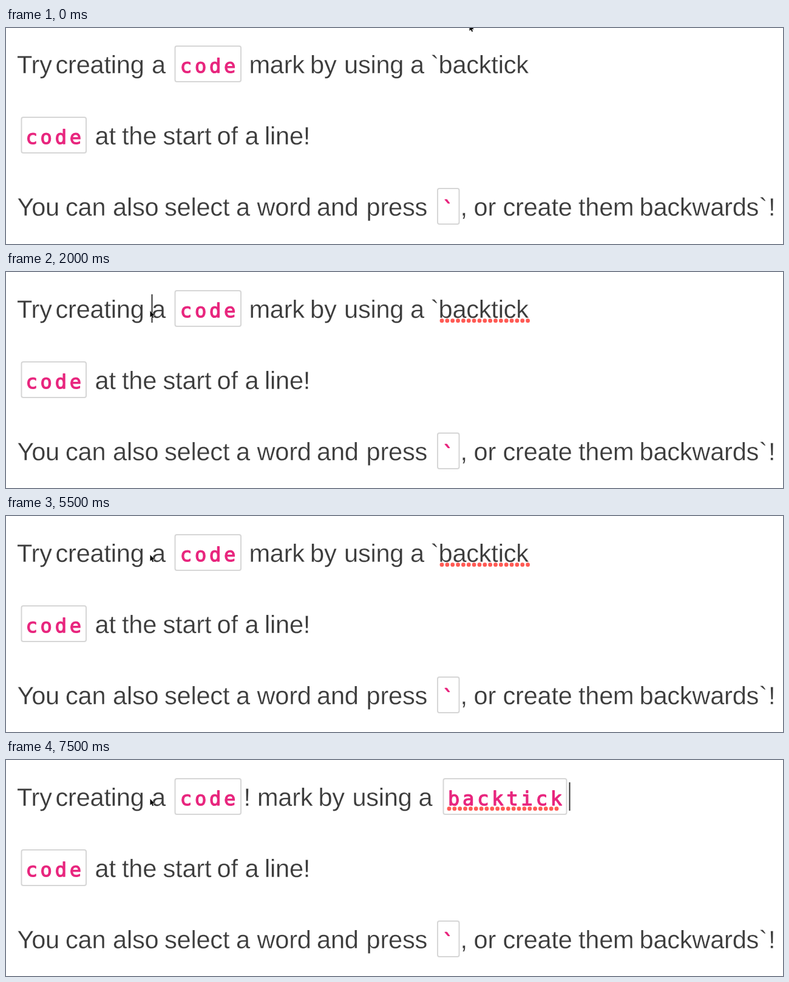
An HTML page that plays this animation: 1280 by 358 pixels, repeating every 8000 ms.

```html
<!DOCTYPE html>
<html lang="en">
<head>
<meta charset="utf-8">
<title>Code marks</title>
<style>
  html, body { margin: 0; width: 100%; height: 100%; overflow: hidden; background: #fff; }
  svg { display: block; width: 1280px; height: 358px; }
  text { white-space: pre; text-rendering: geometricPrecision; }
  /* the white stroke trims the glyphs to a lighter weight */
  .word { font: 41.5px "Liberation Sans", Arial, sans-serif; letter-spacing: -.2px;
          fill: #3c3c3c; stroke: #fff; stroke-width: .3px; }
  .code { font: 32px "DejaVu Sans Mono", monospace; letter-spacing: 4.84px;
          fill: #e8267e; stroke: #e8267e; stroke-width: 1.3px; stroke-linejoin: round; }
  .box { fill: #fff; stroke: #d6d6d6; stroke-width: 2px; }
  .dots { fill: #ff5a54; }
</style>
</head>
<body>
<svg viewBox="0 0 1280 358" xmlns="http://www.w3.org/2000/svg">
  <g id="page"></g>
  <rect id="caret" y="37" width="2" height="47" fill="#333"/>
  <path id="pointer" d="M.5 .5V10.8L2.8 8.7L4.4 12.3L6.1 11.5L4.5 8H7.8Z"
        fill="#000" stroke="#fff" stroke-width="1" stroke-linejoin="round" paint-order="stroke"/>
</svg>
<script>
const LOOP = 8000;
const NS = 'http://www.w3.org/2000/svg';
const byId = id => document.getElementById(id);
const page = byId('page'), caret = byId('caret'), pointer = byId('pointer');

function add(parent, tag, attrs = {}, content = '') {
  const el = document.createElementNS(NS, tag);
  for (const key in attrs) el.setAttribute(key, attrs[key]);
  el.textContent = content;
  parent.append(el);
  return el;
}

const group = parent => add(parent, 'g');

function words(parent, y, list) {
  for (const [x, content] of list) add(parent, 'text', { class: 'word', x, y }, content);
}

function mark(parent, x, width, y, textX, content) {
  add(parent, 'rect', { class: 'box', x, y: y - 44.5, width, height: 59, rx: 3 });
  add(parent, 'text', { class: 'code', x: textX, y: y - .2 }, content);
}

function dots(parent, x, y, count) {
  const g = add(parent, 'g', { class: 'dots' });
  for (let i = 0; i < count; i++) add(g, 'circle', { cx: x + i * 8.85, cy: y, r: 3.4 });
  return g;
}

// First line
words(page, 74.5, [[18, 'Try'], [81.5, 'creating'], [240, 'a']]);
mark(page, 278.5, 108.5, 74.5, 286.8, 'code');
const bang = group(page);
words(bang, 74.5, [[391.5, '!']]);
const tail = group(page);
words(tail, 74.5, [[400.5, 'mark'], [501, 'by'], [557, 'using'], [666, 'a']]);
const plain = group(tail);
words(plain, 74.5, [[699.5, '`'], [712.5, 'backtick']]);
const spelling = dots(plain, 718, 79.7, 17);
const marked = group(page);
mark(marked, 720.5, 203, 74.5, 728, 'backtick');
dots(marked, 730, 79.7, 21);

// Second line
mark(page, 25.5, 106.5, 192.5, 32.5, 'code');
words(page, 192.5, [[146.5, 'at'], [191, 'the'], [258.5, 'start'], [347.5, 'of'], [393.5, 'a'], [426, 'line!']]);

// Third line
words(page, 310.5, [
  [18.5, 'You'], [98, 'can'], [176, 'also'], [261, 'select'], [379, 'a'],
  [413.5, 'word'], [512, 'and'], [593.5, 'press'], [748.5, ','], [770.5, 'or'],
  [818.5, 'create'], [943, 'them'], [1043.5, 'backwards'], [1240.5, '`'], [1256, '!']
]);
mark(page, 711, 35.5, 310.5, 718.7, '`');

// [time, x, y] of the pointer tip
const pointerSteps = [
  [0, 763, -6], [250, 682, 49], [500, 332, 56], [750, 246, 51],
  [1000, 236, 57], [1250, 242, 64], [1500, 245, 66], [1750, 237, 64]
];

// [time, x] of the text caret, null while hidden
const caretSteps = [
  [0, null], [2000, 239.5], [2250, 264], [2500, 273], [3000, 285], [3500, null],
  [3750, 334], [4000, 358], [4500, 382], [5000, 391], [5500, null],
  [5750, 405], [6250, null], [6750, 878], [7250, null], [7500, 927.5]
];

const stepAt = (steps, t) => steps.findLast(step => step[0] <= t);
const show = (el, on) => el.setAttribute('visibility', on ? 'inherit' : 'hidden');
const move = (el, x, y) => el.setAttribute('transform', `translate(${x} ${y})`);

function render(t) {
  const focused = t >= 2000, typed = t >= 5750, wrapped = t >= 7500;
  move(page, 0, focused ? 1 : 0);
  move(tail, typed ? 13.4 : 0, 0);
  show(bang, typed);
  show(spelling, focused);
  plain.setAttribute('display', wrapped ? 'none' : 'inline');
  show(marked, wrapped);

  const [, px, py] = stepAt(pointerSteps, t);
  move(pointer, px, py);

  const [, cx] = stepAt(caretSteps, t);
  show(caret, cx !== null);
  if (cx !== null) caret.setAttribute('x', cx);
}

const start = performance.now();
function tick() {
  render((performance.now() - start) % LOOP);
  requestAnimationFrame(tick);
}
tick();
</script>
</body>
</html>
```
